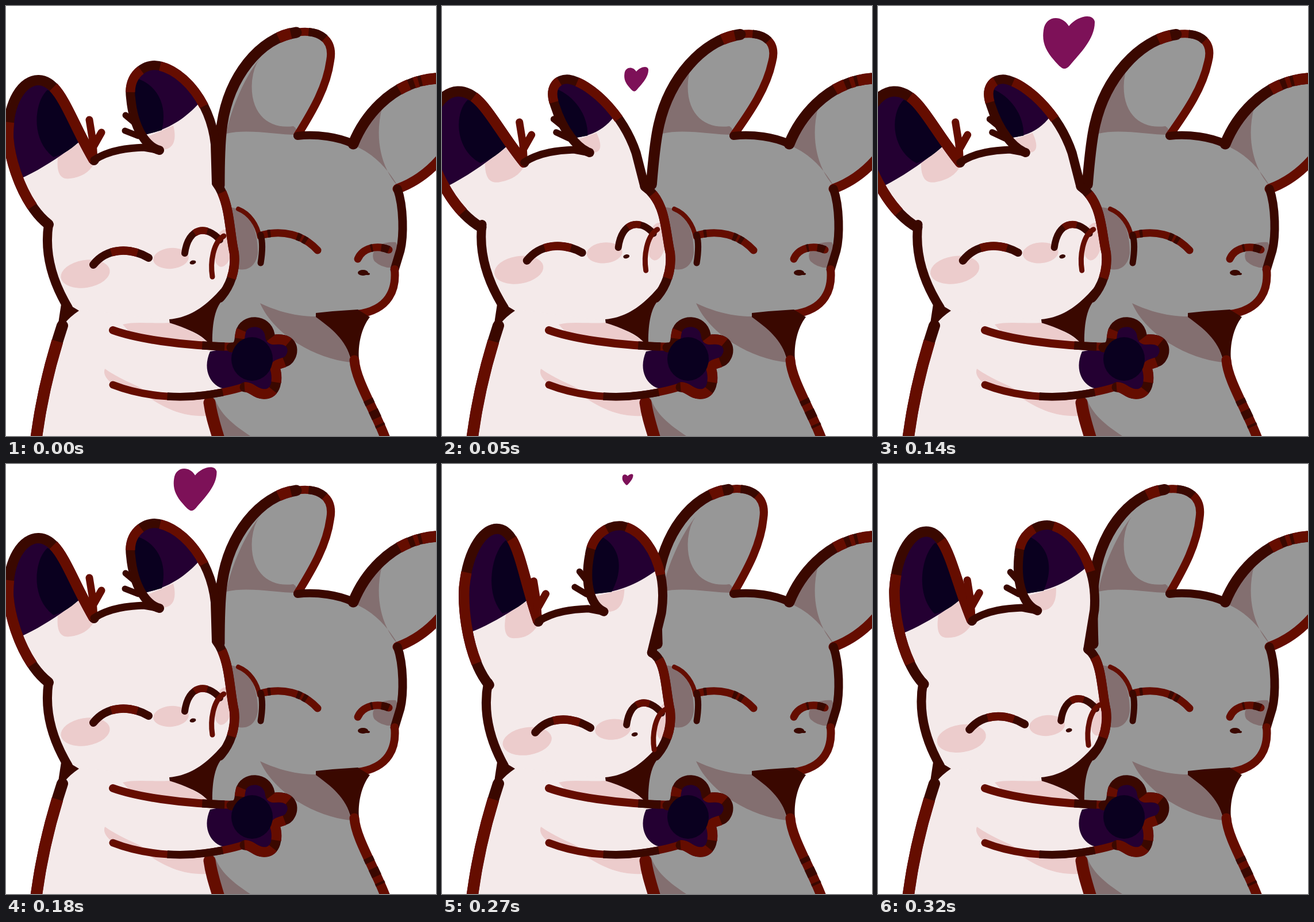
Write an HTML page that moves like this. It is 748 by 748 pixels and loops after 370 ms.

```html
<!DOCTYPE html>
<html lang="en">
<head>
<meta charset="utf-8">
<title>Hug</title>
<style>
  html, body { margin: 0; width: 100%; height: 100%; overflow: hidden; background: #fff; }
  svg { display: block; width: 100%; height: 100%; }
</style>
</head>
<body>
<svg id="stage" viewBox="0 0 748 748"></svg>
<script>
const DARK = '#3a0800', RED = '#650d00', GREY = '#979797', SHADE = '#836f70', WHITE = '#f4eaea',
  PINK = '#eccccc', PURPLE = '#240032', NIGHT = '#0a001f', HEART = '#7d1158';
const LOOP = 370, STEPS = 8, STEP_TIME = 45, TICK = 10;

// Move every coordinate pair of a path by a rule.
const warp = (path, rule) => path.replace(/(-?[\d.]+) (-?[\d.]+)/g,
  (_, x, y) => rule(+x, +y).map(n => +n.toFixed(1)).join(' '));
const withoutStart = path => path.replace(/^M\S+ \S+/, '');

const fill = (d, color) => `<path d="${d}" fill="${color}"/>`;
const stroke = (d, width, color, extra) =>
  `<path d="${d}" fill="none" stroke="${color}" stroke-width="${width}" stroke-linejoin="round" ${extra}/>`;
// A line in one colour with bands of the other, in percent of its length: 0 gap band gap ...
const line = (d, width, base, bands) =>
  stroke(d, width, base, 'stroke-linecap="round"') +
  (bands ? stroke(d, width + .4, base === DARK ? RED : DARK, `pathLength="100" stroke-dasharray="${bands}"`) : '');
const oval = (x, y, rx, ry, color, turn = 0) =>
  `<ellipse cx="${x}" cy="${y}" rx="${rx}" ry="${ry}" fill="${color}" transform="rotate(${turn} ${x} ${y})"/>`;

function greyFriend(lean) {
  const slant = .02 * lean * lean - .055 * lean;
  const pushed = path => warp(path, (x, y) => [x + slant * (226 - y), y + slant * .25 * (226 - y)]);
  const earBack = pushed('M371 312 C371 260 372 230 376 205 C388 125 440 55 505 46');
  const earFront = pushed('M505 46 C545 40 571 58 564 95 C558 140 535 180 507 225');
  const crown = 'M507 226 C540 222 580 228 604 240';
  const rightEar = 'M604 240 C620 200 665 132 748 126';
  const temple = 'M681 318 C692 350 692 400 686 425 L676 458';
  const jaw = 'M676 458 C680 500 660 534 600 537';
  const side = 'M606 616 C608 650 640 700 660 752';
  const shape = earBack + [earFront, crown, rightEar].map(withoutStart).join('') +
    'L760 126 L760 270 Q725 305 681 318' + withoutStart(temple) + withoutStart(jaw) +
    'L620 541 L606 616' + withoutStart(side) + 'L370 748 L355 680 L358 540 L372 500Z';

  return fill(shape, GREY) +
    fill('M383 222 C420 213 470 224 505 224 Q508 214 500 209 C460 215 423 190 428 130 Q431 105 441 92 C418 120 392 175 383 222Z', SHADE) +
    fill('M606 243 C622 212 635 195 654 178 C643 220 647 275 682 314 C664 283 640 257 606 243Z', SHADE) +
    fill('M442 517 C480 535 515 541 545 540 C575 560 595 590 600 620 C535 613 465 570 442 517Z', SHADE) +
    fill('M362 680 C372 710 395 728 425 748 L375 748Z', SHADE) +
    fill('M385 350 C425 350 438 390 438 430 C435 455 415 466 392 453Z', SHADE) +
    fill('M678 411 C645 408 632 430 641 444 Q655 457 674 455 L684 425Z', SHADE) +
    line(earFront, 14, RED, '0 9 13 78') +
    line(earBack, 19, DARK, '0 90 7 3') +
    line(crown, 14, DARK) +
    line(rightEar, 19, DARK, '0 65 10 5 4 3 13') +
    line('M758 263 Q725 302 681 318', 17, RED) +
    line(temple, 15, DARK) +
    line(jaw, 14, RED) +
    fill('M539 534 Q575 530 612 528 L633 541 C618 560 612 590 614 614 L600 616 C592 580 565 560 539 541Z', DARK) +
    line(side, 17, RED, '0 50 6 8 10 8 3 15') +
    line('M404 353 C424 361 437 380 441 402', 8, RED) +
    line('M447 398 C480 390 515 396 542 425', 13, RED, '0 8 5 45 7 4 7 24') +
    line('M443 398 C448 415 445 435 443 447', 11, DARK) +
    line('M612 440 C620 421 645 415 666 424', 13, RED, '0 48 6 24 22') +
    oval(621, 464, 9, 5, DARK) + oval(629, 466, 4, 2, DARK);
}

function whiteBody() {
  return fill('M108 500 L285 530 L355 583 L358 690 L370 748 L52 748 C62 670 82 605 98 552Z', WHITE) +
    fill('M250 682 C280 702 310 715 348 713 L355 680Z', PINK) +
    line('M98 556 C82 605 63 670 52 756', 20, DARK, '0 14 86') +
    line('M354 690 C357 712 363 730 371 756', 21, RED);
}

function whiteHead(lean) {
  const size = Math.abs(lean), nod = lean * (lean < 0 ? .6 : 1);
  // Both ears shear around the point where they meet the crown.
  const shifted = path => warp(path, (x, y) => [x + 10 * lean, y + 4 * size]);
  const onEarL = path => shifted(warp(path, (x, y) => {
    const dx = x - 153, dy = y - 268;
    return [x - lean * (.07 * dx + .09 * dy), y + lean * (.084 * dx + .05 * dy)];
  }));
  const onEarR = path => shifted(warp(path, (x, y) => {
    const dx = x - 267, dy = y - 251, squash = .14 * Math.min(0, lean);
    return [x + squash * dx - .19 * lean * dy, y + .1 * size * dx + squash * dy];
  }));
  const onFace = path => warp(path, (x, y) => [x + 7 * nod, y + nod * (7 + .03 * x)]);
  const blush = (at, rx, ry, turn) => oval(...onFace(at).split(' '), rx, ry, PINK, turn);

  const earL = onEarL('M74 380 C35 350 8 280 4 230 C2 165 30 128 57 129 C95 130 110 195 153 268');
  const crown = shifted('M153 268 C180 250 215 247 240 246 L267 251');
  const earR = onEarR('M267 251 C245 245 222 215 217 160 C212 125 235 104 258 103 C300 105 355 160 364 240 L366 308');
  const cheek = 'M' + earR.split('L')[1] + ' C390 340 388 390 397 430 C400 460 390 488 372 508';
  const nape = warp('M108 525 C75 470 68 420 74 380', (x, y) => [x + .03 * lean * (525 - y), y]);
  const skull = earL + [crown, earR, cheek].map(withoutStart).join('') +
    'C345 532 315 543 285 548 L108 525' + withoutStart(nape) + 'Z';

  return fill(skull, WHITE) +
    fill(onEarL('M90 264 C88 288 93 303 112 300 C130 298 145 290 153 274 L127 238Z'), PINK) +
    fill(onEarR('M245 228 L291 208 C298 235 290 249 273 250Z'), PINK) +
    fill(onEarL('M26 300 C12 270 6 250 4 230 C2 165 30 128 57 129 C85 130 100 165 128 236 C100 258 60 285 26 300Z'), PURPLE) +
    fill(onEarL('M72 146 C48 168 43 235 83 263 Q108 255 127 236 C112 190 97 155 72 146Z'), NIGHT) +
    fill(onEarR('M236 225 C222 205 219 180 217 160 C212 125 235 104 258 103 C285 104 312 130 335 170 C310 197 280 217 236 225Z'), PURPLE) +
    fill(onEarR('M228 126 C262 137 282 172 271 216 L238 225 C222 200 218 155 228 126Z'), NIGHT) +
    blush('138 466', 43, 24, -9) + blush('287 439', 31, 18, -5) + blush('378 421', 16, 33, 8) +
    line(onEarR('M208 190 L226 205 M207 217 L230 226'), 11, DARK) +
    line(earR, 16, DARK, '0 27 10 8 24 31') +
    line(earL, 18, DARK, '0 9 33 27 31') +
    line(shifted('M145 198 L151 235 L153 268 M166 220 L153 243'), 13, RED) +
    line(crown, 13, DARK) +
    line(nape, 16, DARK) +
    fill('M97 512 L127 530 Q112 540 102 552 L88 578 L92 545Z', DARK) +
    fill('M284 545 C320 542 348 522 374 492 L373 516 C363 530 358 555 359 592 L349 583 C335 568 310 560 285 553Z', DARK) +
    line(cheek, 16, DARK, '0 9 72 19') +
    line(onFace('M152 450 C175 421 215 419 248 438'), 14, DARK, '0 36 44 20') +
    line(onFace('M311 430 C317 384 350 381 372 407'), 12, DARK, '0 44 26 30') +
    line(onFace('M379 400 C360 411 355 446 359 471'), 9, RED) +
    oval(...onFace('325 446').split(' '), 5.5, 3.5, DARK, -12);
}

function arm() {
  const top = 'M186 564 C225 578 300 591 400 593';
  const paw = 'M392 594 C408 594 405 580 408 568 C413 543 454 543 459 572 Q459 582 470 580 C500 578 502 600 494 612 C488 624 470 619 468 630 C474 650 470 675 450 675 C434 676 428 662 415 663';
  return fill('M203 554 C225 548 255 553 284 551 Q325 563 349 583 L349 592 Q270 588 214 566Z', PINK) +
    fill(top + 'L405 663 C340 685 250 682 186 659Z', WHITE) +
    fill('M172 631 C195 648 225 658 248 672 L188 660 C175 650 168 640 172 631Z', PINK) +
    fill(paw + 'L380 666 C358 662 340 635 355 601Z', PURPLE) +
    line(top, 14, RED, '0 73 18 9') +
    line('M186 659 C240 680 300 683 345 677 C375 673 398 668 418 661', 13, RED, '0 41 41 18') +
    line(paw, 17, DARK, '0 8 5 24 11 14 15 5 18') +
    oval(428, 614, 36, 38, NIGHT);
}

// The heart rises and slows down; it grows quickly, then shrinks away.
function heart(step) {
  const size = Math.min(18 + 24 * step, 187 - 28 * step);
  if (step === 0 || size <= 0) return '';
  const x = 341 - 3 * step, y = 27 + 4 * (6 - step) ** 2;
  return `<g transform="translate(${x} ${y}) scale(${size / 90}) translate(-45 -46)">` +
    fill('M37 92 C32 92 25 84 19 77 C4 60 -2 45 1 25 C4 0 32 -3 45 18 C59 1 86 -6 90 10 C91 40 64 66 47 86 Q42 92 37 92Z', HEART) + '</g>';
}

const scenes = Array.from({ length: STEPS }, (_, step) => {
  const lean = -1.45 * Math.sin(step / STEPS * 2 * Math.PI);
  return greyFriend(lean) + whiteBody() + whiteHead(lean) + arm() + heart(step);
});

const stage = document.getElementById('stage');
let shown = -1;
function draw() {
  const time = Math.floor(performance.now() % LOOP / TICK) * TICK;
  const step = Math.min(STEPS - 1, Math.floor(time / STEP_TIME));
  if (step !== shown) stage.innerHTML = scenes[shown = step];
  requestAnimationFrame(draw);
}
draw();
</script>
</body>
</html>
```
